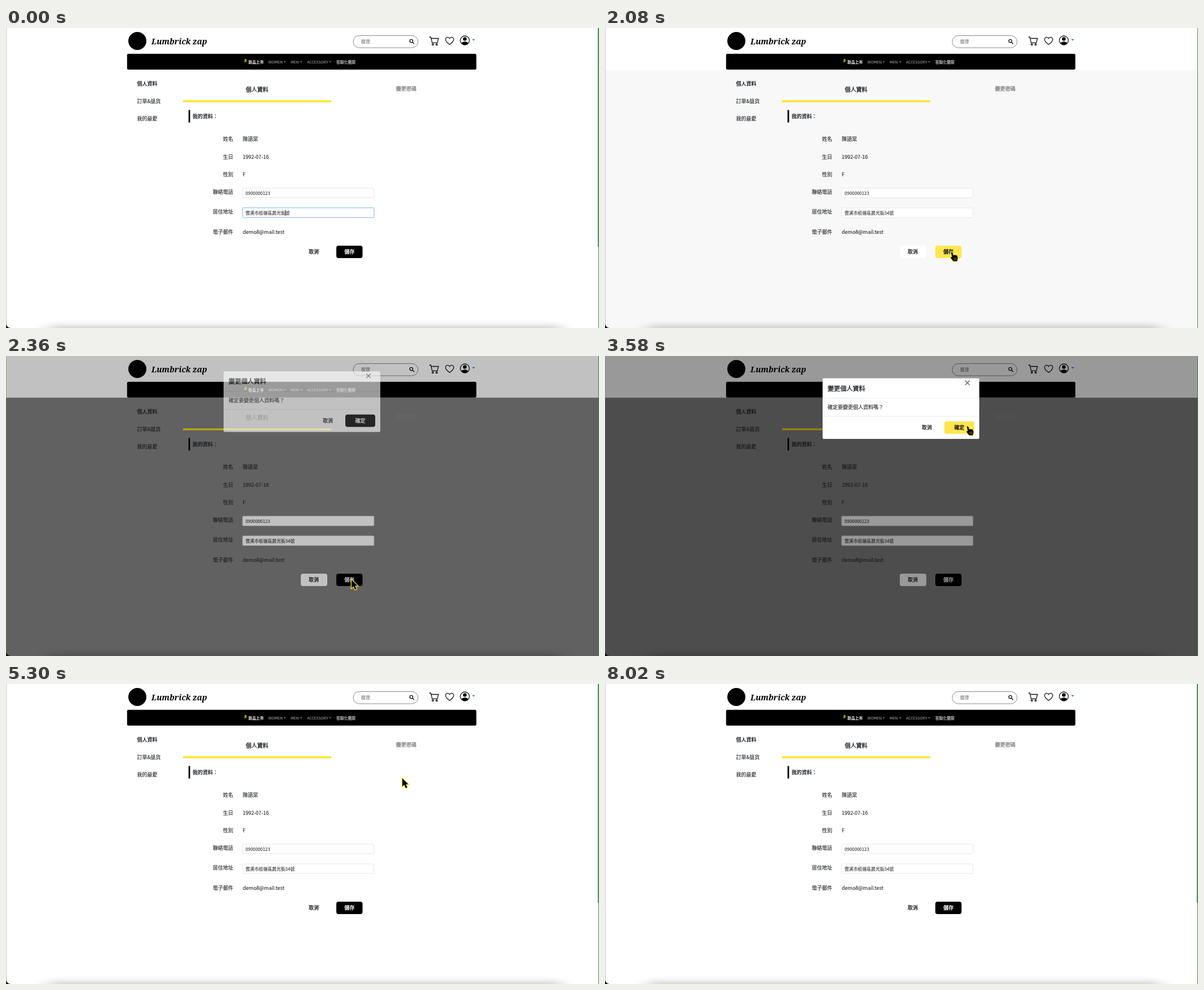
Recreate the animation shown at these times as an HTML page. Size 1052 by 532 pixels, loop 8140 ms.

```html
<!DOCTYPE html>
<html lang="zh-Hant">
<head>
<meta charset="utf-8">
<style>
html, body { margin: 0; width: 100%; height: 100%; overflow: hidden; background: #fff; }
svg { display: block; width: 100vw; height: 100vh; }
text { font: 9px "Noto Sans CJK TC", "Noto Sans CJK", "Noto Sans TC", sans-serif; fill: #212529; white-space: pre; }
.brand { font: italic 700 14px "Noto Serif", serif; fill: #000; }
</style>
</head>
<body>
<svg viewBox="0 0 1052 532">
  <defs>
    <filter id="soft" x="-10%" y="-300%" width="120%" height="700%"><feGaussianBlur stdDeviation="14 6"/></filter>
    <filter id="glow" x="-50%" y="-50%" width="200%" height="200%"><feGaussianBlur stdDeviation="1"/></filter>
    <g id="arrow"><path d="M0 0V14.6L3.4 11.5 6 17.2 8.7 16 6.2 10.5H10.6Z"/></g>
    <g id="hand">
      <path d="M1 1.2Q2.3-.3 3.5 1.4L5 6.2Q6.3 4.8 7.3 6.1 8.7 5 9.6 6.4 11.4 5.7 12 7.6L12.7 11 11.6 16.6H5L1.3 12 .1 9.3Q1.2 8.3 2.8 9.8Z"/>
      <path d="M6.3 10.5V14.5M8.3 10.5V14.5M10.3 10.5V14.5" stroke="#d8c850" stroke-width=".6"/>
    </g>
  </defs>
  <rect id="page" y="73.7" width="1052" height="459"/>
  <rect width="1052" height="73.7" fill="#fff"/>
  <g id="content"></g>

  <circle cx="233" cy="23" r="16"/>
  <text class="brand" x="258" y="29">Lumbrick zap</text>
  <g fill="none" stroke="#111" stroke-width="1.3">
    <rect x="616" y="13.5" width="115" height="21.5" rx="10.7" stroke="#888" stroke-width="1"/>
    <circle cx="719" cy="23" r="2.7"/><path d="M721 25 724.3 28.3"/>
    <path d="M751 16H753.6L756 26.2H765.2L767.2 18.5H754.2"/>
    <circle cx="757.2" cy="29.3" r="1.3"/><circle cx="764" cy="29.3" r="1.3"/>
    <path d="M787 29.3C776 22 780 16.3 783.5 16.3Q786 16.3 787 18.5 788 16.3 790.5 16.3C794 16.3 798 22 787 29.3Z"/>
    <circle cx="814" cy="22" r="8"/>
  </g>
  <circle cx="814" cy="19.4" r="3.2"/>
  <path d="M807.5 26.5Q814 21.5 820.5 26.5 814 33 807.5 26.5Z"/>
  <path d="M827 19.7H832L829.5 22.4Z" fill="#0d6efd"/>

  <rect id="backdrop" width="1052" height="532"/>
  <g id="modal">
    <rect x="386" y="39.5" width="278" height="107.5" rx="2.5" fill="#fff"/>
    <path d="M386 75H664M386 106.8H664" stroke="#dee2e6" stroke-width=".7"/>
    <path d="M639 43.5 647 51.5M647 43.5 639 51.5" stroke="#666" stroke-width="1.5"/>
  </g>
  <rect x="75" y="528" width="910" height="20" opacity=".2" filter="url(#soft)"/>
  <path d="M0 524Q1 531 8 532H0Z"/>
  <path d="M.3 0V532" stroke="#777" stroke-width=".5"/>
  <path d="M1051.5 0V532" stroke="#4c7c4c"/>
  <path id="bar" d="M1050.6 0V388" stroke="#5a985a" stroke-width="1.6"/>
  <g id="cursor">
    <use class="shape" fill="#ffe600" stroke="#ffe600" stroke-width="2.5" opacity=".5" filter="url(#glow)"/>
    <use class="shape" fill="#000" stroke="#fff04a" stroke-width="2" paint-order="stroke"/>
  </g>
</svg>
<script>
const LOOP = 8140, CLICK = 1880, DIM = 2064, OPEN = 2270, CLOSE = 4380;
const YELLOW = '#ffe650';
const $ = id => document.getElementById(id);

function add(parent, tag, attrs, label = '') {
  const el = document.createElementNS('http://www.w3.org/2000/svg', tag);
  for (const k in attrs) el.setAttribute(k, attrs[k]);
  el.textContent = label;
  parent.append(el);
  return el;
}
// y is the optical middle of the line; a hairline stroke gives medium weight
function write(parent, x, y, label, size = 9, weight = 400, fill = '#212529', anchor = 'start') {
  const hairline = { 400: .12, 500: .32 }[weight] || 0;
  return add(parent, 'text', {
    x, y: y + size * .37, 'text-anchor': anchor,
    style: `font-size:${size}px;font-weight:${weight};fill:${fill};stroke:${fill};stroke-width:${hairline}`
  }, label);
}
function box(parent, x, y, width, height, rx, fill, more = {}) {
  return add(parent, 'rect', { x, y, width, height, rx, fill, ...more });
}
function button(parent, x, y, w, h, label) {
  const rect = box(parent, x, y, w, h, 4, '#000');
  const text = write(parent, x + w / 2, y + h / 2, label, 9, 500, '#fff', 'middle');
  return {
    holds: (px, py) => px > x && px < x + w && py > y && py < y + h,
    paint(hover) {
      rect.setAttribute('fill', hover ? YELLOW : '#000');
      text.style.fill = text.style.stroke = hover ? '#111' : '#fff';
    }
  };
}

const content = $('content'), modal = $('modal');
box(content, 214.8, 45.7, 619.6, 28, 2.5, '#000');
write(content, 422.5, 58.3, '#', 8, 700, '#ffe100');
write(content, 430, 60.3, '新品上市', 6.8, 700, '#fff');
[['WOMEN', 465.5, 492.5], ['MEN', 505, 521.5], ['ACCESSORY', 534, 573]].forEach(([label, x, end]) => {
  write(content, x, 60.3, label, 6.8, 400, '#999');
  add(content, 'path', { d: `M${end} 59.2h4l-2 2z`, fill: '#999' });
});
write(content, 586, 60.3, '客製化團服', 6.8, 500, '#999');
write(content, 630, 24.5, '搜尋', 8, 400, '#777');

write(content, 232.5, 98.5, '個人資料', 9, 700);
write(content, 232.5, 130, '訂單&退貨');
write(content, 232.5, 161, '我的最愛');
write(content, 445.5, 109, '個人資料', 10, 500, '#212529', 'middle');
write(content, 710, 107.7, '變更密碼', 9, 500, '#868686', 'middle');
add(content, 'path', { d: 'M314 128.6H577.5L576.5 131.6H314Z', fill: '#ffe10c' });
box(content, 323.8, 145.5, 2.8, 22, 0, '#000');
write(content, 331, 157, '我的資料：', 9, 700);

[[197, '姓名', '陳語棠'], [228.3, '生日', '1992-07-16'], [259.5, '性別', 'F'],
 [291, '聯絡電話'], [326, '居住地址'], [361.3, '電子郵件', 'demo8@mail.test']
].forEach(([y, label, value = '']) => {
  write(content, 403, y, label, 9, 400, '#212529', 'end');
  write(content, 420, y, value);
});

const edge = { stroke: '#dee2e6', 'stroke-width': .8 };
box(content, 419.8, 284, 233, 17, 1.5, '#fff', edge);
write(content, 425, 293, '0900000123', 7.85, 400, '#333');
const halo = box(content, 418.8, 318, 235, 19, 2.5, '#c2dbfe');
const field = box(content, 419.8, 319, 233, 17, 1.5, '#fff', edge);
const address = write(content, 425, 328, '', 7.85, 400, '#333');
const caret = box(content, 0, 322.5, .8, 11, 0, '#111');

box(content, 523, 386, 47, 22, 4, '#fff');
write(content, 546, 397, '取消', 9, 500, '#212529', 'middle');
const save = button(content, 586, 386, 46.5, 22, '儲存');

write(modal, 395, 57.5, '變更個人資料', 11.1, 500);
write(modal, 395, 91, '確定要變更個人資料嗎？');
write(modal, 571, 127, '取消', 9, 500, '#212529', 'middle');
const confirm = button(modal, 602, 116, 53, 22, '確定');

// pointer stops: time, x, y
const path = [
  [540, 508, 371], [920, 508, 371], [1250, 600, 404], [1450, 627, 406], [1700, 613, 397],
  [3000, 613, 397], [3300, 689, 260], [3580, 641, 124], [5000, 641, 124], [5300, 703, 167],
  [5600, 711, 270], [5800, 713, 296], [6080, 706, 303], [7220, 706, 303], [7800, 797, -24], [LOOP, 797, -24]
];
const clamp = v => Math.max(0, Math.min(1, v));

function slope(i, axis) {
  const a = path[i - 1], b = path[i], c = path[i + 1];
  const still = !a || !c || a[1] === b[1] && a[2] === b[2] || b[1] === c[1] && b[2] === c[2];
  return still ? 0 : (c[axis] - a[axis]) / (c[0] - a[0]);
}
function pointer(t) {
  const i = Math.max(0, path.findIndex(p => p[0] > t) - 1);
  const a = path[i], b = path[i + 1], span = b[0] - a[0], u = clamp((t - a[0]) / span);
  const s = u * u * (3 - 2 * u);
  return [1, 2].map(k => a[k] + (b[k] - a[k]) * s
    + span * u * (1 - u) * (slope(i, k) * (1 - u) - slope(i + 1, k) * u));
}

function draw(t) {
  const leave = clamp((t - CLOSE) / 180);
  const shown = clamp((t - OPEN) / 150) * (1 - leave);
  const drop = t < CLOSE ? Math.pow(1 - clamp((t - OPEN) / 300), 2.2) : leave;
  const gray = Math.round(255 - 127 * clamp((t - DIM) / 290) * (1 - leave));
  $('page').setAttribute('fill', `rgb(${gray},${gray},${gray})`);
  $('backdrop').setAttribute('opacity', .4 * shown);
  modal.setAttribute('opacity', shown);
  modal.setAttribute('transform', `translate(0 ${-27 * drop})`);
  $('bar').setAttribute('opacity', t >= DIM && t < CLOSE + 180 ? 0 : 1);

  const digits = '34'.slice(0, (t >= 20) + (t >= 240));
  const focused = t < CLICK;
  address.textContent = `雲溪市松嶺區晨光街${digits}號`;
  caret.setAttribute('x', 495.4 + digits.length * 4.36);
  caret.setAttribute('opacity', +focused);
  halo.setAttribute('opacity', +focused);
  field.setAttribute('stroke', focused ? '#86b7fe' : '#dee2e6');

  const [x, y] = pointer(t), open = t >= OPEN && t < CLOSE;
  const onSave = t >= 540 && t < OPEN && save.holds(x, y);
  const onConfirm = open && confirm.holds(x, y);
  save.paint(onSave);
  confirm.paint(onConfirm);
  $('cursor').setAttribute('transform', `translate(${x} ${y})`);
  $('cursor').setAttribute('opacity', t < 540 ? 0 : 1);
  for (const el of document.querySelectorAll('.shape'))
    el.setAttribute('href', onSave || onConfirm ? '#hand' : '#arrow');
}

const start = performance.now();
function tick() {
  draw((performance.now() - start) % LOOP);
  requestAnimationFrame(tick);
}
tick();
</script>
</body>
</html>
```
